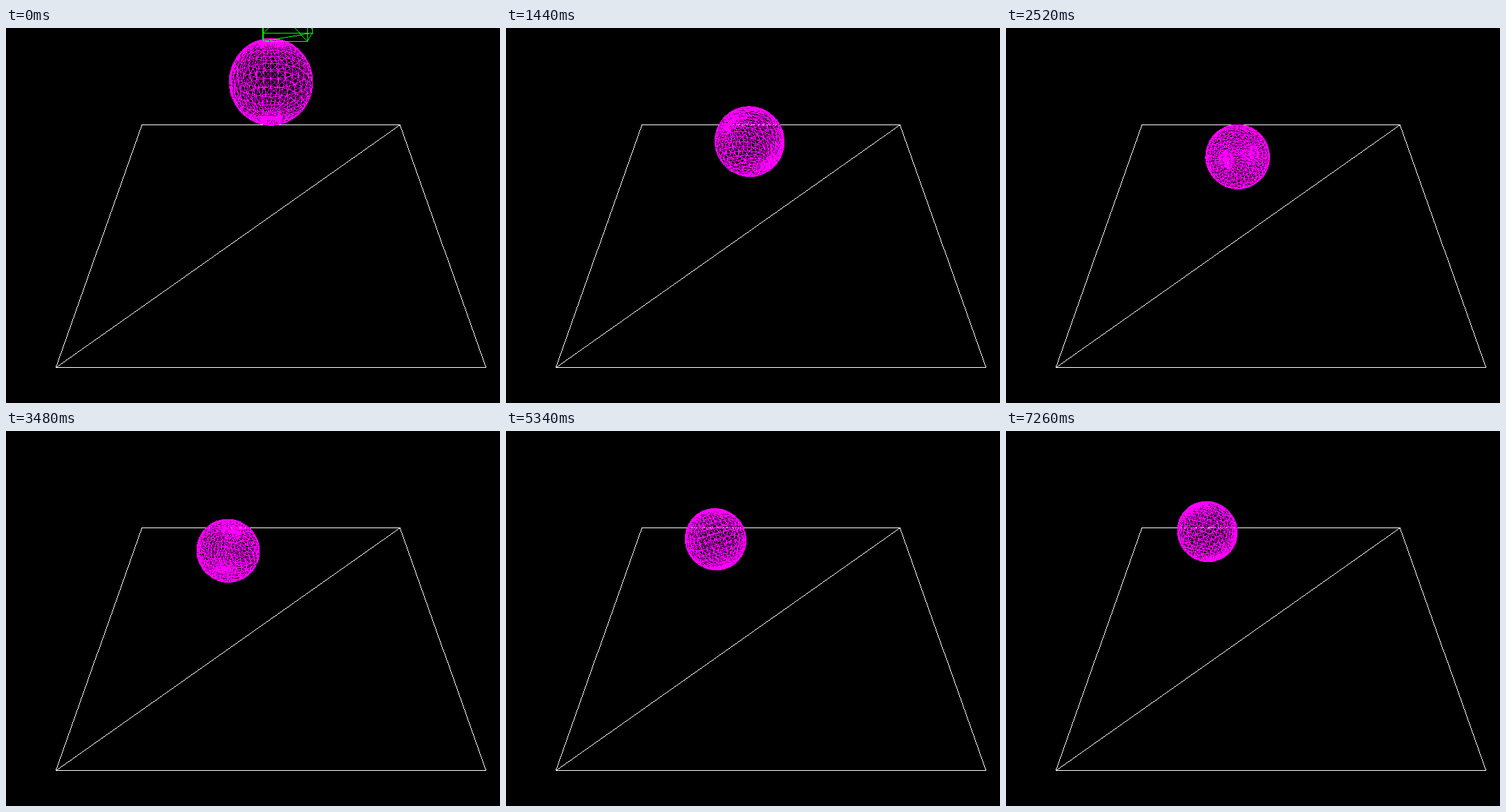
An HTML page with a canvas that plays this animation: 715 px wide and 544 px high, repeating every 7320 ms.

```html
<!DOCTYPE html>
<html lang="en">
<head>
<meta charset="utf-8">
<title>Wireframe physics</title>
<style>
html, body { margin: 0; width: 100%; height: 100%; overflow: hidden; background: #000; }
canvas { display: block; }
</style>
</head>
<body>
<canvas id="stage" width="715" height="544"></canvas>
<script>
const W = 715, H = 544, LOOP = 7320, STEP = 60;
const WHITE = 0xffffffff, MAGENTA = 0xffff00ff, GREEN = 0xff00ff00, BLACK = 0xff000000;
const ctx = document.getElementById('stage').getContext('2d');
const image = ctx.createImageData(W, H);
const pixels = new Uint32Array(image.data.buffer);

// Camera at (0, 10, 10), looking at the origin
const FOCAL = 660.2, CX = 383.5, CY = 272.5, Q = Math.SQRT1_2;
const toView = ([x, y, z]) => [x, Q * (y - z), 20 * Q - Q * (y + z)];
const toScreen = ([x, up, depth]) => [CX + FOCAL * x / depth, CY - FOCAL * up / depth];
const project = p => toScreen(toView(p));

// Hard-edged line, one pixel wide
function line([x0, y0], [x1, y1], color) {
  const n = Math.max(1, Math.ceil(Math.max(Math.abs(x1 - x0), Math.abs(y1 - y0))));
  for (let i = 0; i <= n; i++) {
    const x = Math.floor(x0 + (x1 - x0) * i / n);
    const y = Math.floor(y0 + (y1 - y0) * i / n);
    if (x >= 0 && x < W && y >= 0 && y < H) pixels[y * W + x] = color;
  }
}

function drawPlane() {
  const [a, b, c, d] = [[-5, 0, -5], [5, 0, -5], [5, 0, 5], [-5, 0, 5]].map(project);
  for (const [p, q] of [[a, b], [b, c], [c, d], [d, a], [b, d]]) line(p, q, WHITE);
}

// Ball keys: time, x, z, roll angle
const KEYS = [
  [0, 0, 0, 0], [.25, -.07, -.01, .25], [.78, -.32, -.32, .8], [1.44, -.615, -.82, 1.42],
  [2.03, -.85, -1.16, 1.9], [2.52, -1.037, -1.386, 2.22], [3.48, -1.364, -1.852, 2.8],
  [5.34, -1.815, -2.477, 3.57], [6.48, -2.02, -2.758, 3.92], [7.26, -2.133, -2.923, 4.12]
];

function slope(i, k) {
  const a = KEYS[Math.max(0, i - 1)], b = KEYS[Math.min(KEYS.length - 1, i + 1)];
  return (b[k] - a[k]) / (b[0] - a[0]);
}

function sample(t, k) {
  let i = 0;
  while (i < KEYS.length - 2 && t > KEYS[i + 1][0]) i++;
  const a = KEYS[i], b = KEYS[i + 1], h = b[0] - a[0], s = (t - a[0]) / h, r = 1 - s;
  return r * r * (1 + 2 * s) * a[k] + s * s * (1 + 2 * r) * b[k]
    + s * r * h * (r * slope(i, k) - s * slope(i + 1, k));
}

const REST = 1.22, HIT = .25, LAND = 2.03;
function ballHeight(t) {
  if (t < HIT) return REST + 3.3 * (1 - t / HIT) * (1 + .12 * t / HIT);
  return t < LAND ? REST + 1.4 * (t - HIT) * (LAND - t) : REST;
}

// Unit sphere
const COLS = 32, ROWS = 16;
const sphere = [];
for (let j = 0; j <= ROWS; j++) {
  const v = Math.PI * j / ROWS;
  for (let i = 0; i <= COLS; i++) {
    const u = 2 * Math.PI * i / COLS;
    sphere.push([-Math.cos(u) * Math.sin(v), Math.cos(v), Math.sin(u) * Math.sin(v)]);
  }
}

function drawBall(t) {
  const x = sample(t, 1), y = ballHeight(t), z = sample(t, 2), angle = sample(t, 3);
  const c = Math.cos(angle), s = Math.sin(angle), ax = -.813, az = .582;
  const pts = sphere.map(([px, py, pz]) => {
    const dot = (ax * px + az * pz) * (1 - c);
    return project([
      x + px * c - az * py * s + ax * dot,
      y + py * c + (az * px - ax * pz) * s,
      z + pz * c + ax * py * s + az * dot
    ]);
  });
  const row = COLS + 1;
  for (let j = 0; j < ROWS; j++) {
    for (let i = 0; i < COLS; i++) {
      const p = j * row + i;
      line(pts[p], pts[p + 1], MAGENTA);
      line(pts[p], pts[p + row], MAGENTA);
      // The cells at the poles are single triangles
      if (j > 0 && j < ROWS - 1) line(pts[p], pts[p + row + 1], MAGENTA);
    }
  }
}

// Corner bits: 1 right, 2 top, 4 near
const cubeEdges = [[2, 1], [4, 7], [3, 6], [0, 5], [0, 6], [3, 5]];
for (let i = 0; i < 8; i++)
  for (const bit of [1, 2, 4]) if (!(i & bit)) cubeEdges.push([i, i | bit]);

function drawCube(t) {
  const [x, up, depth] = toView([.33 + .493 * t, 6.21 + 8.915 * t - 1.465 * t * t, .06 + .848 * t]);
  if (depth < 1.5) return;
  const tilt = .21 - .022 * t, yaw = .03, roll = .013;
  const pts = [];
  for (let i = 0; i < 8; i++) {
    const a = (i & 1 ? .5 : -.5), b = (i & 2 ? .5 : -.5), c = (i & 4 ? .5 : -.5);
    pts.push(toScreen([
      x + a - roll * b + yaw * c,
      up + b + roll * a - tilt * c,
      depth - (c + tilt * b - yaw * a)
    ]));
  }
  for (const [i, j] of cubeEdges) line(pts[i], pts[j], GREEN);
}

function frame() {
  const t = Math.floor(performance.now() % LOOP / STEP) * STEP / 1000;
  pixels.fill(BLACK);
  drawPlane();
  drawBall(t);
  drawCube(t);
  ctx.putImageData(image, 0, 0);
  requestAnimationFrame(frame);
}
frame();
</script>
</body>
</html>
```
